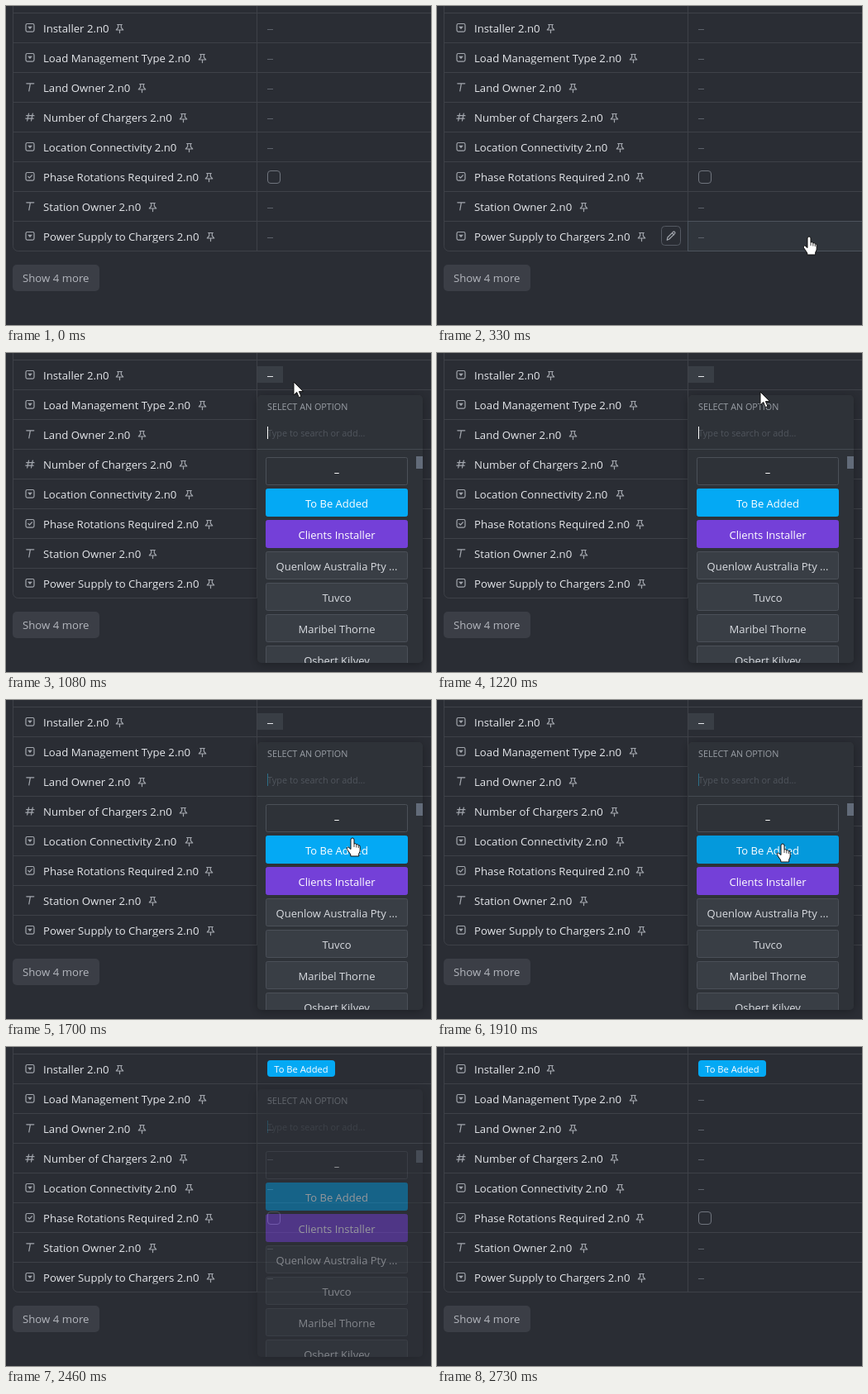
Write an HTML page that moves like this. It is 514x386 px and loops after 3540 ms.

```html
<!DOCTYPE html>
<html lang="en">
<head>
<meta charset="utf-8">
<title>Picking an option in a field table</title>
<style>
  html, body { margin: 0; width: 100%; height: 100%; overflow: hidden; background: #2a2d34; }
  svg { display: block; width: 514px; height: 386px; font: 13.2px "Open Sans", "Noto Sans", sans-serif; }
  .grid { fill: none; stroke: #3e4148; }
  .label { fill: #e4e6ea; }
  .icon { fill: none; stroke: #a3a7ae; stroke-width: 1.2; stroke-linejoin: round; stroke-linecap: round; }
  .solid { fill: #a3a7ae; stroke: none; }
  .dash { stroke: #5d626b; }
  .hover { fill: #30353c; stroke: #4c535d; }
  .edit { fill: none; stroke: #555a63; }
  .option text { font-size: 13px; text-anchor: middle; fill: #d9dce1; }
  .option.strong text { fill: #fff; }
</style>
</head>
<body>
<svg viewBox="0 0 514 386">
  <defs>
    <clipPath id="line"><rect x="40" y="0" width="260" height="25.5"/></clipPath>
    <clipPath id="panel"><rect x="304" y="51" width="200" height="324" rx="5"/></clipPath>
    <filter id="shadow" x="-20%" y="-20%" width="140%" height="140%">
      <feDropShadow dx="0" dy="2" stdDeviation="6" flood-color="#000" flood-opacity=".3"/>
    </filter>
    <g id="select" class="icon">
      <rect x="24" y="12.5" width="10" height="9.6" rx="1.8"/>
      <path class="solid" d="M26.2 15.8h5.6L29 19.2z"/>
    </g>
    <path id="text" class="icon" d="M24.8 12.8h9M29.4 12.8l-1.6 9"/>
    <path id="number" class="icon" d="M27.5 13l-1.8 9M32.3 13l-1.8 9M24.7 15.7h9.3M23.9 19.2h9.3"/>
    <g id="check" class="icon">
      <rect x="24" y="12.5" width="10" height="9.6" rx="1.8"/>
      <path d="M26.8 17.4l1.6 1.6 3-3.2"/>
    </g>
    <path id="pin" class="icon" d="M-2.8 13.5h5.6M-1.8 13.5v3.6l-2.4 2.9h8.4L1.8 17.1v-3.6M0 20v3.6"/>
  </defs>

  <g id="rows"></g>
  <path class="grid" d="M8.5 0V290.500a6 6 0 0 0 6 6H514M303.500 0V296"/>
  <rect x="316.500" y="199.500" width="15" height="15" rx="3.500" fill="none" stroke="#70757e"/>
  <rect x="8" y="313" width="105" height="32" rx="5" fill="#3b3e46"/>
  <text x="20" y="334" fill="#b4b7be">Show 4 more</text>

  <g id="hover">
    <rect class="hover" x="303.500" y="-.5" width="212" height="36"/>
    <path class="dash" d="M316 19.500h7"/>
    <rect class="edit" x="271.500" y="5.500" width="23" height="23" rx="4"/>
    <path class="icon" d="M278.200 22.300l.7-3.300 6.700-6.700q1-.8 1.900 .1t.1 1.900l-6.700 6.700zM284.300 13.600l2.300 2.300"/>
  </g>

  <g id="active">
    <rect x="304" y="16" width="31" height="20" fill="#393e45"/>
    <path d="M316 28.500h7" stroke="#e4e6ea"/>
  </g>
  <g id="chip">
    <rect x="304" y="18" width="30" height="18" fill="#2a2d34"/>
    <rect x="316" y="16" width="82" height="20" rx="4" fill="#04a9f4"/>
    <text x="357" y="30.500" font-size="11.200" text-anchor="middle" fill="#fff">To Be Added</text>
  </g>

  <g id="popup">
    <rect x="304" y="51" width="200" height="324" rx="5" fill="#2f3338" filter="url(#shadow)"/>
    <text x="316" y="69" font-size="10.800" fill="#9a9fa6">SELECT AN OPTION</text>
    <text x="316" y="101" font-size="10.900" fill="#50555d">Type to search or add...</text>
    <path id="caret" d="M316.500 89v15"/>
    <path d="M304 116.500h200" stroke="#454a51"/>
    <rect x="496" y="125" width="8" height="15" fill="#626b79"/>
    <g id="options" clip-path="url(#panel)"></g>
  </g>

  <g id="cursor" fill="#fff" stroke="#111" stroke-linejoin="round">
    <path id="arrow" d="M0 0V16l3.700-3.500 2.600 6.200 2.700-1.100-2.600-6H11.500z"/>
    <g id="hand">
      <path d="M-2 2a2 2 0 0 1 4 0V7q2.200-1 2.800.8q2-.6 2.500 1q1.900-.3 1.900 1.600V15q0 2-1.500 4v3H-2.200v-2L-6.500 13.500q-1-2.300 1-2.500q1 0 3.500 2.600z"/>
      <path d="M2 7v4M4.800 8v3.500M7.300 9v3" fill="none" stroke-width=".8"/>
    </g>
  </g>
</svg>
<script>
const LOOP = 3540, ROW = 36, TOP = 9;
const $ = id => document.getElementById(id);

// kind, label, pin centre
const fields = [
  ["select", "Installer", 137.5],
  ["select", "Load Management Type", 237.5],
  ["text", "Land Owner", 164.5],
  ["number", "Number of Chargers", 214.5],
  ["select", "Location Connectivity", 221.5],
  ["check", "Phase Rotations Required", 245.5],
  ["text", "Station Owner", 177.5],
  ["select", "Power Supply to Chargers", 247.5],
];
$("rows").innerHTML = fields.map(([kind, name, pin], i) => `
  <g transform="translate(0 ${TOP + i * ROW})">
    <path class="grid" d="M8 -.5H514"/>
    <use href="#${kind}"/>
    <text class="label" x="45" y="23" clip-path="url(#line)">${name} 2.n0</text>
    <use href="#pin" x="${pin}"/>
    ${kind === "check" ? "" : '<path class="dash" d="M316 19.5h7"/>'}
  </g>`).join("");

const BLUE = "#04a9f4", BLUE_MID = "#04a1e8", BLUE_DARK = "#0499dc";
const options = [
  ["–", "none"], ["To Be Added", BLUE], ["Clients Installer", "#7440d8"],
  ["Quenlow Australia Pty ..."], ["Tuvco"], ["Maribel Thorne"], ["Osbert Kilvey"],
];
$("options").innerHTML = options.map(([name, fill], i) => {
  const tinted = i === 1 || i === 2;
  return `<g class="option ${i < 3 ? "strong" : ""}" transform="translate(314 ${126 + i * 38})">
    <rect x=".5" y=".5" width="171" height="33" rx="2" fill="${fill || "#393e45"}"
      stroke="${tinted ? fill : "#4b5058"}"/>
    <text x="86" y="${i ? 23 : 22.5}">${name}</text>
  </g>`;
}).join("");
const target = $("options").children[1].firstElementChild;

// Each track is a list of [start time, value...]; a value holds until the next start.
const cursor = [
  [0, ""], [130, "arrow", 505, 370], [200, "arrow", 478, 326], [270, "hand", 450, 279],
  [340, "hand", 423, 229], [410, "hand", 395, 168], [480, "hand", 369, 110],
  [540, "hand", 347, 60], [610, "hand", 334, 32], [680, "hand", 341, 34],
  [1080, "arrow", 348, 35], [1150, "arrow", 369, 40], [1220, "arrow", 391, 47],
  [1290, "arrow", 399, 63], [1350, "arrow", 405, 82], [1420, "arrow", 409, 105],
  [1490, "hand", 413, 127], [1560, "hand", 416, 145], [1630, "hand", 418, 158],
  [1700, "hand", 419, 167], [1770, "hand", 419, 170], [1840, "hand", 418, 173],
  [1910, "hand", 418, 174], [2180, "hand", 438, 178], [2250, "hand", 474, 184], [2320, ""],
];
const hover = [
  [0, -1], [270, 7], [340, 6], [410, 4], [480, 2], [540, 1], [610, 0], [1010, -1],
  [2530, 5], [2590, 6], [2660, 7], [2730, -1],
];
const popup = [[0, 0], [1010, .5], [1080, 1], [2460, .5], [2530, 0]];
const active = [[0, 0], [940, 1], [2250, 0]];
const chip = [[0, 0], [2250, 1]];
const caret = [[0, "#fff"], [1490, "#2d6f88"]];
const fill = [[0, BLUE], [1840, BLUE_MID], [1910, BLUE_DARK]];

const at = (track, t) => track.findLast(step => step[0] <= t).slice(1);
const show = (id, on) => $(id).style.display = on ? "" : "none";

function draw(t) {
  const [shape, x = 0, y = 0] = at(cursor, t);
  show("arrow", shape === "arrow");
  show("hand", shape === "hand");
  $("cursor").setAttribute("transform", `translate(${x} ${y})`);

  const [row] = at(hover, t);
  show("hover", row >= 0);
  $("hover").setAttribute("transform", `translate(0 ${TOP + row * ROW})`);
  // The checkbox row has no dash.
  $("hover").children[1].style.display = row === 5 ? "none" : "";
  $("hover").firstElementChild.style.fillOpacity = row === 5 ? .3 : 1;

  const [opacity] = at(popup, t);
  show("popup", opacity);
  $("popup").style.opacity = opacity;
  show("active", at(active, t)[0]);
  show("chip", at(chip, t)[0]);
  $("caret").setAttribute("stroke", at(caret, t)[0]);
  const [colour] = at(fill, t);
  target.setAttribute("fill", colour);
  target.setAttribute("stroke", colour);
}

const start = performance.now();
function frame() {
  draw((performance.now() - start) % LOOP);
  requestAnimationFrame(frame);
}
frame();
</script>
</body>
</html>
```
